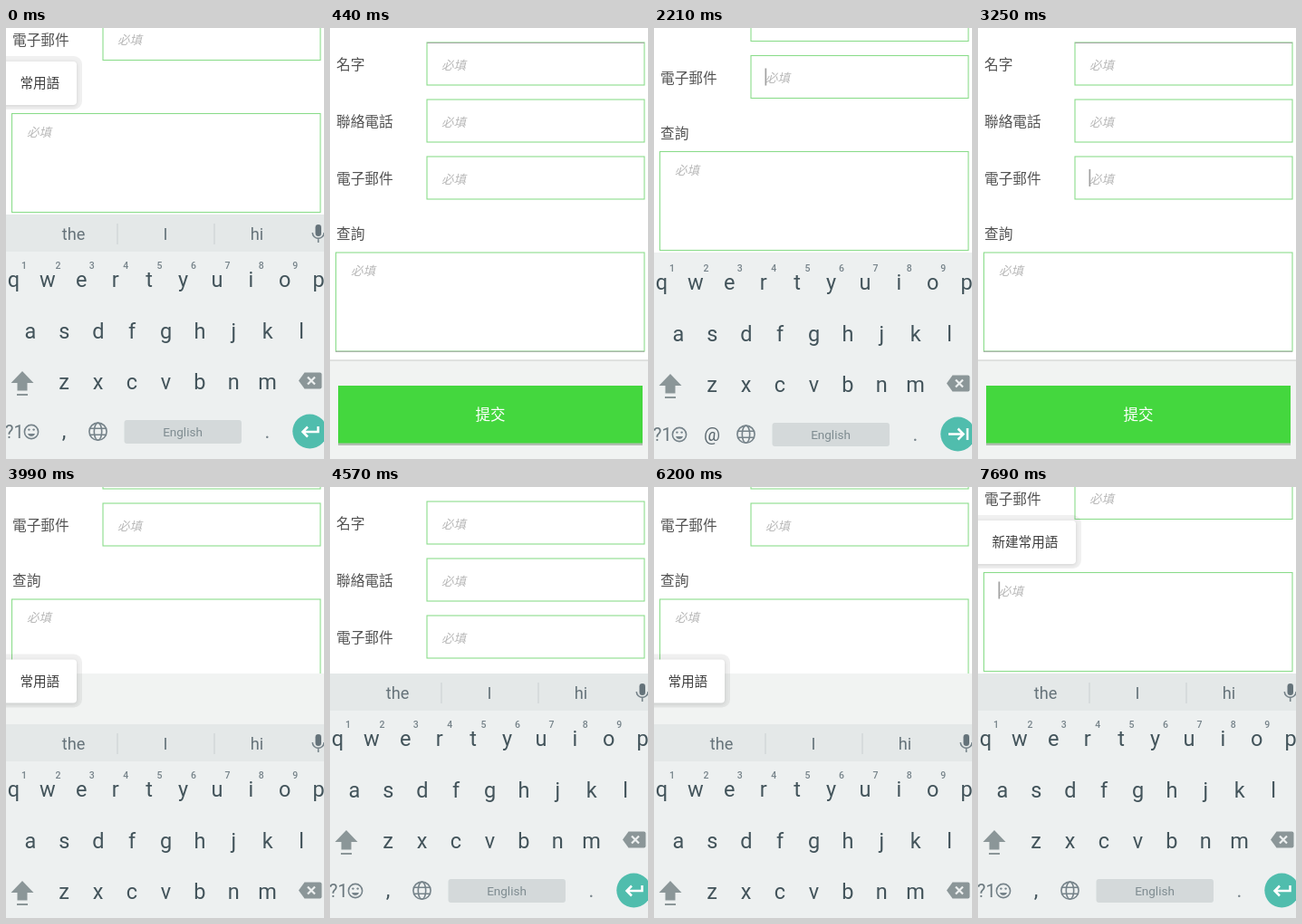
An HTML page that plays this animation: 351x476 px, repeating every 7.99 s.

```html
<!DOCTYPE html>
<html lang="zh-Hant">
<head>
<meta charset="utf-8">
<style>
html, body { margin: 0; width: 100%; height: 100%; overflow: hidden; background: #fff; }
svg { display: block; width: 351px; height: 476px; }
text { font-family: Roboto, sans-serif; }
.cjk { font-family: "Noto Sans CJK TC", "Noto Sans CJK", "Noto Sans CJK JP", sans-serif; }
.label { font-size: 15.7px; fill: #525252; }
.hint { font-size: 13.5px; font-style: italic; fill: #b8b8b8; }
.field { fill: #fff; stroke: #8bdc8b; stroke-width: 1.1; }
.key { font-size: 23.5px; fill: #43545b; text-anchor: middle; }
.digit { font-size: 10.5px; font-weight: 500; fill: #76838a; text-anchor: middle; }
.word { font-size: 18.2px; fill: #66737a; text-anchor: middle; }
.line { fill: none; stroke: #76838a; stroke-width: 1.6; }
.enter { fill: none; stroke: #fff; stroke-width: 2.5; }
#card { filter: drop-shadow(0 1px 2px rgba(0, 0, 0, .13)); }
</style>
</head>
<body>
<svg viewBox="0 0 351 476">
  <defs><clipPath id="view"><rect id="viewBox" width="351" height="476"/></clipPath></defs>
  <rect width="351" height="476" fill="#f1f3f2"/>
  <g clip-path="url(#view)">
    <rect width="351" height="476" fill="#fff"/>
    <g id="page"></g>
  </g>
  <g id="keyboard"></g>
  <g id="popup">
    <rect id="halo" x="-10" y="-6" height="59" rx="9" fill="#000" fill-opacity=".06"/>
    <rect id="card" x="-10" height="48" rx="4" fill="#fff"/>
    <text id="phrase" class="cjk" x="15.4" y="29.3" font-size="14.6" font-weight="500" fill="#3c3c3c"></text>
  </g>
</svg>
<script>
const $ = id => document.getElementById(id);
const text = (cls, x, y, s) => `<text class="${cls}" x="${x}" y="${y}">${s}</text>`;
const rect = (x, y, w, h, extra) => `<rect x="${x}" y="${y}" width="${w}" height="${h}" ${extra}/>`;
const path = (d, extra) => `<path d="${d}" ${extra}/>`;
const show = (id, on) => $(id).style.display = on ? '' : 'none';

function buildPage() {
  const row = (name, y) => text('label cjk', 7, y + 30, name)
    + rect(107, y, 240, 47, 'class="field"') + text('hint cjk', 123, y + 29.5, '必填');
  return row('名字', 16) + row('聯絡電話', 79) + row('電子郵件', 142)
    + text('label cjk', 7, 233, '查詢')
    + rect(6.5, 248, 340.5, 109, 'class="field"') + text('hint cjk', 23, 273.3, '必填')
    + `<g id="idle">${path('M107 16.5H347M6 357.3H347', 'stroke="#a4a9a4"')}</g>`
    + rect(22.5, 258, 1.7, 19, 'id="caretQuery" fill="#a0a0a0"')
    + rect(122.5, 156, 1.7, 19, 'id="caretMail" fill="#a0a0a0"')
    + rect(0, 367, 351, 109, 'fill="#f1f3f2"') + rect(0, 366.5, 351, 1, 'fill="#c9cbca"')
    + rect(9, 397, 336, 64, 'fill="#b3bdb2"') + rect(9, 395, 336, 63.5, 'fill="#44d73e"')
    + '<text class="cjk" x="177" y="433" font-size="16.5" fill="#fff" text-anchor="middle">提交</text>';
}

function buildKeyboard() {
  const step = 37.4;
  const keys = (letters, x, y) => [...letters].map((c, i) => text('key', x + i * step, y, c)).join('');
  const digits = [...'123456789'].map((c, i) => text('digit', 20 + i * step, 265.5, c)).join('');
  const strip = rect(0, 206, 351, 41, 'fill="#e4e8e8"')
    + text('word', 74.5, 234, 'the') + text('word', 176, 234, 'I') + text('word', 277, 234, 'hi')
    + path('M123 216V239M230 216V239', 'stroke="#c9cfd0"')
    + rect(341.5, 217, 6.5, 13, 'rx="3.25" fill="#65737a"')
    + path('M338.3 226a6.4 6.4 0 0 0 12.8 0M344.7 232.5V237', 'class="line"');
  const smile = '<circle cx="28" cy="446" r="7.6" class="line"/>'
    + path('M24 448a4.2 4.2 0 0 0 8 0z', 'fill="#76838a"')
    + '<circle cx="25.4" cy="443.6" r="1.2" fill="#76838a"/><circle cx="30.6" cy="443.6" r="1.2" fill="#76838a"/>';
  const globe = '<circle cx="101.5" cy="445.7" r="9.6" class="line"/><ellipse cx="101.5" cy="445.7" rx="4.2" ry="9.6" class="line"/>'
    + path('M93 442.3H110M93 449.2H110', 'class="line"');
  return rect(0, 245, 351, 300, 'fill="#edf0f0"')
    + `<g id="strip">${strip}</g>`
    + keys('qwertyuiop', 8.5, 286) + digits
    + keys('asdfghjkl', 27, 342.5) + keys('zxcvbnm', 64.2, 398.5)
    + path('M18 379L30.5 392H23.5V400.5H12.5V392H5.5ZM12 404H24V406H12Z', 'fill="#8b9698"')
    + path('M329.5 380.5H346.5Q348.5 380.5 348.5 382.5V396.5Q348.5 398.5 346.5 398.5H329.5L323 389.5Z', 'fill="#8b9698"')
    + path('M333 385.5L341 393.5M341 385.5L333 393.5', 'stroke="#edf0f0" stroke-width="2.2"')
    + '<text x="-1" y="453" font-size="20" fill="#6b787e">?1</text>' + smile + globe
    + rect(130.5, 433, 129.5, 26, 'rx="3" fill="#d4d9da"')
    + '<text x="195" y="451" font-size="13.5" fill="#7f8c91" text-anchor="middle">English</text>'
    + '<text x="288.5" y="453" font-size="22" fill="#76838a" text-anchor="middle">.</text>'
    + '<circle cx="335.3" cy="445.5" r="19" fill="#50bdad"/>'
    + `<g id="keysText">${text('key', 64, 453, ',')}${path('M344.5 440V446H328M333 440.5L327.5 446L333 451.5', 'class="enter"')}</g>`
    + `<g id="keysMail"><text x="64" y="452.5" font-size="20" fill="#5a676e" text-anchor="middle">@</text>${path('M325 445.5H341M335.5 439.5L341.5 445.5L335.5 451.5M346 439V452', 'class="enter"')}</g>`;
}

$('page').innerHTML = buildPage();
$('keyboard').innerHTML = buildKeyboard();

const closed = { scroll: 0, view: 476, slide: null, mail: false, caret: '', popup: null, wide: false };
const typing = { ...closed, scroll: 153.5, view: 206, slide: 0, popup: 37 };
const rising = (scroll, slide, popup = null) => ({ ...typing, scroll, slide, popup });
const unscrolled = { ...typing, scroll: 0, popup: null };
const mailTyping = { ...closed, scroll: 111.5, view: 248, slide: 3, mail: true, caret: 'mail' };
const mailRising = (scroll, slide) => ({ ...mailTyping, scroll, slide });
const queryCaret = { ...closed, caret: 'query' };
const mailCaret = { ...closed, caret: 'mail' };

const LOOP = 7990;
const timeline = [
  [0, typing], [290, unscrolled], [440, closed],
  [590, rising(124, 56, 190.5)], [730, typing], [880, unscrolled],
  [1020, queryCaret], [1610, closed],
  [1910, mailRising(30, 170)], [2060, mailRising(90, 60)], [2210, mailTyping],
  [2950, { ...mailTyping, scroll: 0 }], [3100, closed], [3250, mailCaret], [3550, closed],
  [3840, rising(40, 180)], [3990, rising(124, 56, 190.5)], [4140, rising(150, 6, 60)], [4280, typing],
  [4570, unscrolled], [4720, queryCaret], [5150, closed], [5600, queryCaret],
  [6050, rising(40, 180)], [6200, rising(124, 56, 190.5)], [6350, rising(150, 6, 60)], [6500, typing],
  [7090, { ...typing, caret: 'query' }],
  [7240, { ...typing, wide: true }], [7690, { ...typing, wide: true, caret: 'query' }]
];

function draw(s) {
  $('viewBox').setAttribute('height', s.view);
  $('page').setAttribute('transform', `translate(0 ${-s.scroll})`);
  show('idle', s.slide === null);
  show('caretQuery', s.caret === 'query');
  show('caretMail', s.caret === 'mail');
  show('keyboard', s.slide !== null);
  $('keyboard').setAttribute('transform', `translate(0 ${s.slide || 0})`);
  show('strip', !s.mail);
  show('keysText', !s.mail);
  show('keysMail', s.mail);
  show('popup', s.popup !== null);
  $('popup').setAttribute('transform', `translate(0 ${s.popup || 0})`);
  const edge = s.wide ? 108 : 78;
  $('card').setAttribute('width', edge + 10);
  $('halo').setAttribute('width', edge + 16);
  $('phrase').textContent = s.wide ? '新建常用語' : '常用語';
}

let current;
const start = performance.now();
function tick() {
  const t = (performance.now() - start) % LOOP;
  const state = timeline.findLast(([at]) => at <= t)[1];
  if (state !== current) draw(current = state);
  requestAnimationFrame(tick);
}
tick();
</script>
</body>
</html>
```
